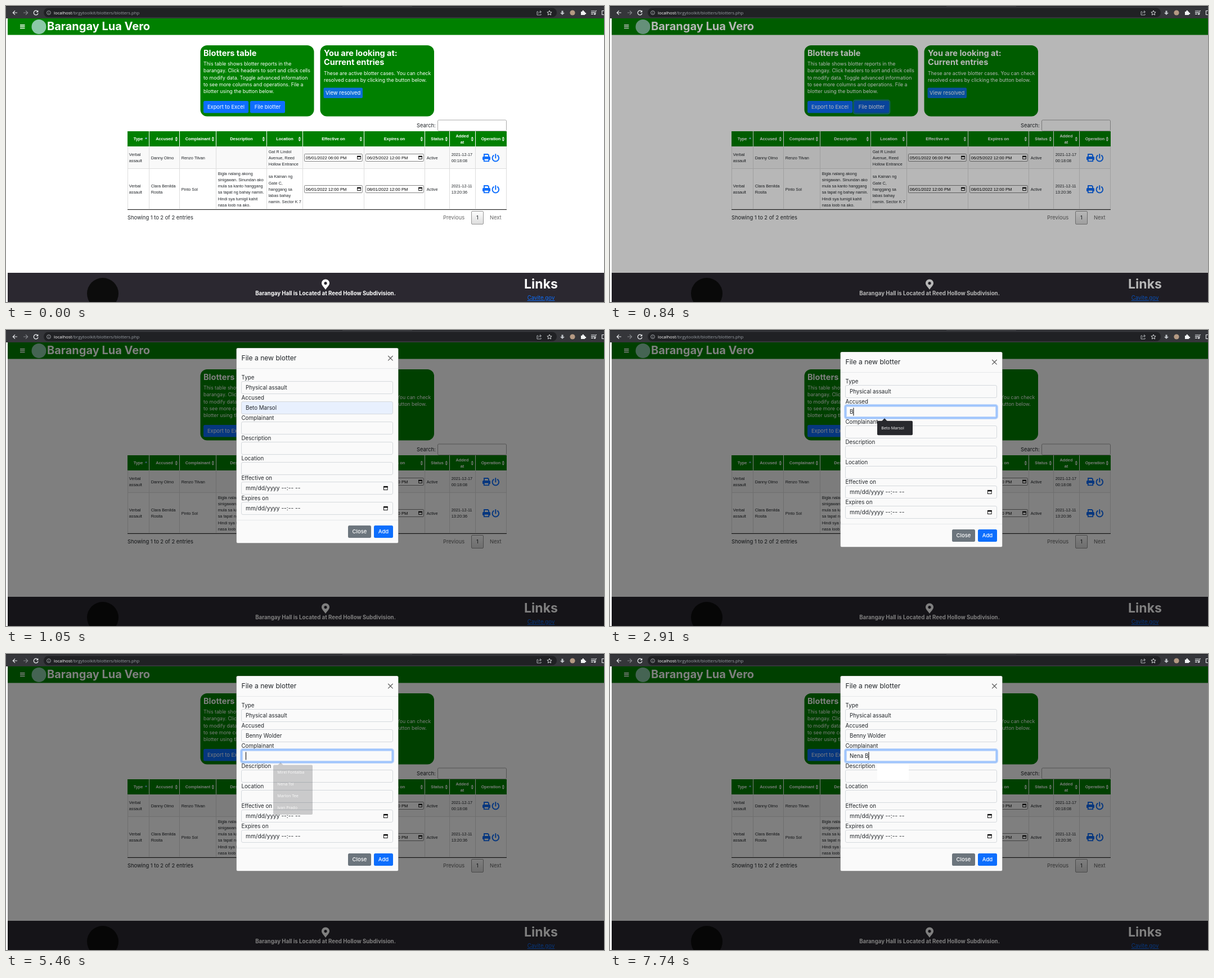
These frames come from a looping animation (1063 px wide and 527 px high, 8000 ms). An HTML page:

```html
<!DOCTYPE html>
<html lang="en">
<head>
<meta charset="utf-8">
<title>Blotters</title>
<style>
  html, body { margin: 0; width: 100%; height: 100%; overflow: hidden; background: #fff; }
  svg { display: block; width: 1063px; height: 527px; }
  text { font: 9.35px Inter, sans-serif; fill: #212529; white-space: pre; }
  .white { fill: #fff; }
  .para { font-size: 8.75px; fill: #fff; }
  .head { font-size: 14.5px; font-weight: 700; fill: #fff; }
  .brand { font-size: 20px; font-weight: 700; fill: #fff; }
  .links { font-size: 23px; font-weight: 700; fill: #fff; }
  .place { font-size: 9.7px; font-weight: 700; fill: #fff; }
  .cell { font: 7.3px "Liberation Sans", Arial, sans-serif; }
  .th { font: 700 7.35px "Liberation Sans", Arial, sans-serif; fill: #fff; }
  .stamp { font: 7.6px "Liberation Sans", Arial, sans-serif; fill: #000; }
  .muted { fill: #666; }
  .link { font-size: 9.7px; fill: #0d6efd; text-decoration: underline; }
  .url { font: 7.75px "Open Sans", sans-serif; fill: #9aa0a6; }
  .form { font-size: 9.75px; }
  .date { font-size: 10.2px; }
  .title { font-size: 12.1px; }
  .btn { font-size: 9.5px; font-weight: 500; fill: #fff; }
  .tip { font: 7.2px "Open Sans", sans-serif; fill: #fff; }
  .mid { text-anchor: middle; }
  .anim { animation: 8s linear infinite; }
  .ring { fill: none; stroke: #0d6efd; }

  #file { animation-name: press; }
  #fileRing { animation-name: pressRing; }
  #shade { animation-name: shade; }
  #modal { animation: appear 8s linear infinite, drop 8s linear infinite; }
  #ring1 { animation-name: ring1; }
  #ring2 { animation-name: ring2; }
  #tip1 { animation-name: tip1; }
  #tip2 { animation-name: tip2; }
  #tip3 { animation-name: tip3; }

  @keyframes press { 0%, 7.5% { fill: #0d6efd; } 9.375%, 100% { fill: #0b5ed7; } }
  @keyframes pressRing { 0%, 7.5% { opacity: 0; } 9.375%, 100% { opacity: .5; } }
  @keyframes shade { 0%, 9.5625% { opacity: 0; } 11.25%, 100% { opacity: .5; } }
  @keyframes appear { 0%, 10.875% { opacity: 0; } 12.75%, 100% { opacity: 1; } }
  @keyframes drop {
    0% { transform: translateY(-36px); }
    10.875% { transform: translateY(-36px); animation-timing-function: ease-out; }
    14.5%, 100% { transform: translateY(0); }
  }
  @keyframes ring1 { 0%, 21% { opacity: 0; } 22.6%, 66% { opacity: 1; } 67.875%, 100% { opacity: 0; } }
  @keyframes ring2 { 0%, 66% { opacity: 0; } 67.875%, 100% { opacity: 1; } }
  @keyframes tip1 { 0%, 36.3% { opacity: 0; } 36.31%, 39.75% { opacity: 1; } 42%, 100% { opacity: 0; } }
  @keyframes tip2 { 0%, 67.875% { opacity: 0; } 69.6%, 81.3% { opacity: 1; } 81.31%, 100% { opacity: 0; } }
  @keyframes tip3 { 0%, 81.3% { opacity: 0; } 81.31%, 94.875% { opacity: 1; } 96.7%, 100% { opacity: 0; } }
</style>
</head>
<body>
<svg id="stage" viewBox="0 0 1063 527"></svg>
<script>
const GREEN = '#008000', BLUE = '#0d6efd', PALE = '#fafafa', FILLED = '#e8f0fe', LOOP = 8000;

const text = (x, y, s, cls = '', attr = '') => `<text x="${x}" y="${y}" class="${cls}" ${attr}>${s}</text>`;
const lines = (x, y, step, list, cls) => list.map((s, i) => text(x, y + i * step, s, cls)).join('');
const rect = (x, y, w, h, fill, attr = '') => `<rect x="${x}" y="${y}" width="${w}" height="${h}" fill="${fill}" ${attr}/>`;
const path = (d, color, width = 1.2, attr = '') =>
  `<path d="${d}" fill="none" stroke="${color}" stroke-width="${width}" ${attr}/>`;
const solid = (d, fill, attr = '') => `<path d="${d}" fill="${fill}" ${attr}/>`;
const circle = (x, y, r, fill) => `<circle cx="${x}" cy="${y}" r="${r}" fill="${fill}"/>`;

const calendar = (x, y, s) =>
  rect(x + .5, y + 1, s - 1, s - 1.5, 'none', 'stroke="#000" stroke-width=".9"') + rect(x, y + .4, s, s * .32, '#000');

function toolbar() {
  return rect(0, 0, 1063, 22, '#35363a') + rect(0, 0, 598, 1, '#202124') + rect(722, 0, 341, 1, '#202124') +
    rect(67, 3.5, 912, 16.5, '#202124', 'rx="8"') +
    path('M20 12H12.5M16 8.3L12.3 12L16 15.7', '#e8eaed') +
    path('M31 12H38.5M35 8.3L38.7 12L35 15.7', '#85878b') +
    path('M56 9.3A3.9 3.9 0 1 0 57 13', '#e8eaed', 1.3) + solid('M57.3 7.5V11.3H53.5Z', '#e8eaed') +
    path('M72.6 12a3.4 3.4 0 1 0 6.8 0a3.4 3.4 0 1 0 -6.8 0M76 11.6V14M76 9.8V10.6', '#bdc1c6', .8) +
    text(85, 15, '<tspan fill="#fff">localhost</tspan>/brgytoolkit/blotters/blotters.php', 'url') +
    path('M946 10H944V16H951V14M946 13.5C946.5 11 948 10.5 951 10.5M949 8L951.5 10.5L949 13', '#bdc1c6', .9) +
    path('M966 8L967.2 10.8L970.1 11L967.9 13L968.6 16L966 14.4L963.4 16L964.1 13L961.9 11L964.8 10.8Z', '#e8eaed', .9) +
    solid('M987.5 8.5H990.5V12H993L989 16L985 12H987.5Z', '#bdc1c6') +
    circle(1007, 12, 4.6, '#b59a83') +
    solid('M1022 10H1024.3A1.6 1.6 0 1 1 1027.3 10H1029V12A1.5 1.5 0 1 1 1029 14.6V16H1022Z', '#f1f3f4') +
    path('M1040 9H1047M1040 11.7H1047M1040 14.4H1044', '#e8eaed', 1.2) + circle(1046.6, 14.2, 1.5, '#e8eaed') +
    path('M1048 14V8.5H1050', '#e8eaed', .9) +
    path('M1064 8.5H1059.5V15.5H1064', '#e8eaed', 1.1);
}

function banner() {
  return rect(3, 22, 1060, 29.5, GREEN) + path('M25 33.7H33.5M25 36.6H33.5M25 39.5H33.5', '#fff', 1.5) +
    circle(58.5, 37, 13, '#8cc9a8') + text(73, 43, 'Barangay Lua Vero', 'brand');
}

function cards() {
  return rect(345.5, 70, 202, 126.5, GREEN, 'rx="12"') + rect(558.5, 70, 202.5, 126.5, GREEN, 'rx="12"') +
    text(351, 88.5, 'Blotters table', 'head') +
    lines(351, 105.7, 12.4, [
      'This table shows blotter reports in the',
      'barangay. Click headers to sort and click cells',
      'to modify data. Toggle advanced information',
      'to see more columns and operations. File a',
      'blotter using the button below.'], 'para') +
    lines(565, 88.5, 16.6, ['You are looking at:', 'Current entries'], 'head') +
    lines(565, 122.5, 12.4, [
      'These are active blotter cases. You can check',
      'resolved cases by clicking the button below.'], 'para') +
    rect(351, 169, 80, 21.5, BLUE, 'rx="2.5"') + text(391, 183, 'Export to Excel', 'white mid') +
    rect(432.8, 167.8, 64.4, 23.9, 'none', 'rx="3.5" stroke="#3184fd" stroke-width="2.4" id="fileRing" class="anim"') +
    rect(434, 169, 62, 21.5, BLUE, 'rx="2.5" id="file" class="anim"') + text(465, 183, 'File blotter', 'white mid') +
    rect(564.5, 145.5, 69.5, 18.5, '#0b6fd8', 'rx="2"') + text(599.2, 158, 'View resolved', 'white mid');
}

const edges = [216, 255, 309, 374, 464, 528, 637, 745, 789, 835, 890];
const heads = ['Type', 'Accused', 'Complainant', 'Description', 'Location', 'Effective on',
  'Expires on', 'Status', 'Added|at', 'Operation'];
const centers = [235, 281.5, 341, 418.5, 495.5, 582, 690.5, 766.5, 811, 862];

// Each cell is a list of lines, centred on the row.
const rows = [
  { top: 250, bottom: 290, cells: ['Verbal|assault', 'Danny Olmo', 'Renzo Tilvan', '',
    'Gat R Lindol|Avenue, Reed|Hollow Entrance', '05/01/2022 06:00 PM', '06/25/2022 12:00 PM', 'Active',
    '2021-12-17|00:18:08'] },
  { top: 290, bottom: 362, cells: ['Verbal|assault', 'Clara Benilda|Rosita', 'Pinto Sol',
    'Bigla nalang akong|sinigawan. Sinundan ako|mula sa kanto hanggang|sa tapat ng bahay namin.|Hindi sya tumigil kahit|nasa loob na ako.',
    'sa Kainan ng|Gate C,|hanggang sa|labas bahay|namin. Sector K 7', '06/01/2022 12:00 PM', '08/01/2022 12:00 PM',
    'Active', '2021-12-11|13:20:36'] }
];

const printer = (x, y) =>
  path(`M${x + 3} ${y + 5}V${y + 1}H${x + 9.5}L${x + 11} ${y + 2.5}V${y + 5}`, BLUE, 1.9) +
  rect(x, y + 5, 14, 6.3, BLUE, 'rx="1.5"') +
  rect(x + 2.8, y + 8.8, 8.4, 4.5, '#fff', `stroke="${BLUE}" stroke-width="1.8"`);
const power = (x, y) =>
  path(`M${x - 3.6} ${y - 4.5}A5.8 5.8 0 1 0 ${x + 3.6} ${y - 4.5}M${x} ${y - 6.5}V${y}`, BLUE, 2, 'stroke-linecap="round"');

function table() {
  let out = rect(216, 223, 674, 27, GREEN) + rect(216, 250, 674, 40, '#f9f9f9');
  heads.forEach((h, i) => {
    const parts = h.split('|');
    out += lines(centers[i], 239.2 - (parts.length - 1) * 5.5, 11, parts, 'th mid');
    const x = edges[i + 1] - 6.2;
    out += i ? solid(`M${x - 2.4} 236.2L${x} 232.6L${x + 2.4} 236.2ZM${x - 2.4} 237.6L${x} 241.2L${x + 2.4} 237.6Z`, '#d3e6d3')
             : solid('M246.8 236.8L249 233.5L251.2 236.8Z', '#7fb8e8');
  });
  for (const { top, bottom, cells } of rows) {
    const mid = (top + bottom) / 2;
    cells.forEach((c, i) => {
      const x = edges[i] + 2.7;
      if (i === 5 || i === 6) {
        out += rect(x - .2, mid - 6.5, 102.8, 13, '#fff', 'rx="1" stroke="#767676" stroke-width=".9"') +
          text(x + 2, mid + 2.7, c, 'stamp') + calendar(x + 93.5, mid - 3.6, 6.6);
      } else {
        const parts = c.split('|');
        out += lines(x, mid + 2.8 - (parts.length - 1) * 5.6, 11.2, parts, 'cell');
      }
    });
    out += printer(847, mid - 7) + power(870.3, mid + .6) + rect(216, bottom - 1, 674, 1, '#ddd');
  }
  edges.forEach((x, i) => {
    out += rect(i ? x - 1 : x, 250, 1, 112, '#ddd');
    if (i && i < 10) out += rect(x - 1, 223, 1, 27, '#fff');
  });
  return out + rect(216, 362, 674, 1, '#222') +
    text(730, 215.7, 'Search:') + rect(767.5, 203, 122, 19.5, '#fff', 'rx="2" stroke="#aaa"') +
    text(216, 380, 'Showing 1 to 2 of 2 entries') + text(777, 380, 'Previous', 'muted') +
    rect(827.5, 365.5, 21, 23, 'url(#page)', 'rx="1.5" stroke="#979797"') + text(838, 380, '1', 'mid') +
    text(860, 380, 'Next', 'muted');
}

function footer() {
  return rect(3, 475, 1060, 52, '#2b2830') + circle(172, 512, 28, '#0c0c0c') +
    solid('M568 505C565 500 561 497.5 561 493.5A7 7 0 0 1 575 493.5C575 497.5 571 500 568 505ZM568 491A2.6 2.6 0 1 0 568 496.2A2.6 2.6 0 1 0 568 491Z', '#fff', 'fill-rule="evenodd"') +
    text(568, 514.5, 'Barangay Hall is Located at Reed Hollow Subdivision.', 'place mid') +
    text(951, 503, 'Links', 'links mid') + text(951, 523, 'Cavite.gov', 'link mid');
}

const labels = ['Type', 'Accused', 'Complainant', 'Description', 'Location', 'Effective on', 'Expires on'];
const fieldY = i => Math.floor(98.7 + 35.83 * i) + .5;
const baseline = i => fieldY(i) + 14.4;

// One span per letter, so that each can appear on its own.
const letters = s => [...s].map(c => `<tspan>${c}</tspan>`).join('');

function modal() {
  let out = rect(409.5, 39, 288, 347.5, PALE, 'rx="2.5" stroke="#000" stroke-opacity=".2"') +
    text(418.5, 61.3, 'File a new blotter', 'title') +
    path('M679.2 53L687.6 61.4M687.6 53L679.2 61.4', '#555', 1.1) +
    rect(410, 75, 287, 1, '#e6e8ea') + rect(410, 345, 287, 1, '#e6e8ea');
  labels.forEach((label, i) => {
    const y = fieldY(i);
    out += text(418.5, y - 3.6, label, 'form') +
      rect(418.5, y, 269, 22, PALE, `id="field${i}" rx="2.5" stroke="#d5d9dd"`);
    if (i > 4) out += text(426, y + 14.2, 'mm/dd/yyyy --:-- --', 'date') + calendar(671, y + 7, 7.6);
    if (i === 1 || i === 2) {
      const box = `x="418.5" y="${y}" width="269" height="22" rx="2.5"`;
      out += `<g id="ring${i}" class="anim ring"><rect ${box} stroke-width="5" opacity=".28"/><rect ${box} stroke="#86b7fe"/></g>`;
    }
  });
  return out + text(426, baseline(0), 'Physical assault', 'form') +
    rect(0, 138.5, 1, 14, '#000', 'id="caret"') + rect(426, 138, 0, 15, '#0078d7', 'id="mark"') +
    text(426, baseline(1), 'Beto Marsol', 'form', 'id="saved"') +
    text(426, baseline(1), letters('Benny Wolder'), 'form', 'id="accused"') +
    text(426, baseline(2), letters('Nena B'), 'form', 'id="victim"') +
    text(426, 184, 'Mirel Fontalba', 'cell', 'id="preview"') +
    rect(608, 355, 41, 22, '#6c757d', 'rx="2.5"') + text(628.5, 369.4, 'Close', 'btn mid') +
    rect(654, 355, 34, 22, BLUE, 'rx="2.5"') + text(671, 369.4, 'Add', 'btn mid');
}

const tip = (id, y, w, h, items, extra = '') => `<g id="${id}" class="anim">` +
  solid(`M483 ${y + .5}L488 ${y - 4.5}L493 ${y + .5}Z`, '#28292d') +
  rect(475, y, w, h, '#28292d', 'rx="2"') + extra + lines(482.3, y + 15.6, 20.8, items, 'tip') + '</g>';

const el = id => document.getElementById(id);

el('stage').innerHTML = `<defs><linearGradient id="page" x2="0" y2="1"><stop stop-color="#fff"/>
  <stop offset="1" stop-color="#dcdcdc"/></linearGradient></defs>` +
  rect(0, 0, 1063, 527, '#fff') + toolbar() + banner() + cards() + table() + footer() +
  rect(3, 22, 1060, 505, '#000', 'id="shade" class="anim"') +
  `<g id="modal">${modal()}</g>` +
  rect(475, 196, 56, 28.5, '#fff', 'id="blank"') +
  tip('tip1', 161.8, 63, 25.5, ['Beto Marsol']) +
  tip('tip2', 197.5, 70, 88.5, ['Mirel Fontalba', 'Nena Tol', 'Marlon Tee', 'Ivan Prado'],
    rect(475, 198.5, 70, 22.5, '#3f4144', 'id="hover"')) +
  tip('tip3', 197.5, 56, 26, ['Nena Tol']);

// Holds each style until the next stop; every stop is [ms, style] and falls just before its tick.
function hold(node, stops) {
  const frames = stops.map(([ms, style]) => ({ ...style, offset: Math.max(0, ms - 5) / LOOP, easing: 'step-end' }));
  frames.push({ ...stops[stops.length - 1][1], offset: 1 });
  node.animate(frames, { duration: LOOP, iterations: Infinity });
}
const seen = on => ({ visibility: on ? 'visible' : 'hidden' });
const during = (node, from, to) =>
  hold(node, [[0, seen(false)], [from, seen(true)], ...(to ? [[to, seen(false)]] : [])]);

// Shows the letters at their key times and returns the caret stops that follow them.
function type(id, keys, row) {
  const node = el(id);
  return keys.map((ms, i) => {
    during(node.children[i], ms);
    return [ms, node.getEndPositionOfChar(i).x, row];
  });
}

function blink(moves) {
  const stops = [[0, seen(false)]];
  moves.forEach(([ms, x, row], i) => {
    const end = i + 1 < moves.length ? moves[i + 1][0] : LOOP;
    for (let t = ms, on = true; t < end; t += 500, on = !on)
      stops.push([t, { ...seen(on), transform: `translate(${x}px, ${row * 36}px)` }]);
  });
  stops[0][1].transform = stops[1][1].transform;
  hold(el('caret'), stops);
}

const savedWidth = el('saved').getComputedTextLength();
el('mark').setAttribute('width', savedWidth + 1);
during(el('mark'), 2190, 2910);
hold(el('saved'), [[0, { fill: '#212529', ...seen(true) }], [2190, { fill: '#fff', ...seen(true) }],
  [2910, { fill: '#fff', ...seen(false) }]]);
hold(el('field1'), [[0, { fill: FILLED }], [2910, { fill: PALE }]]);
hold(el('field2'), [[0, { fill: PALE }], [6150, { fill: FILLED }], [6510, { fill: PALE }]]);
during(el('preview'), 6150, 6510);
during(el('hover'), 6150, 6510);
during(el('blank'), 7590);

blink([
  [1680, 426 + savedWidth, 0],
  ...type('accused', [2910, 3180, 3360, 3510, 3780, 4020, 4170, 4350, 4410, 4470, 4530, 4590], 0),
  [5430, 426, 1],
  ...type('victim', [6510, 6660, 6960, 7020, 7170, 7590], 1)
]);
</script>
</body>
</html>
```
